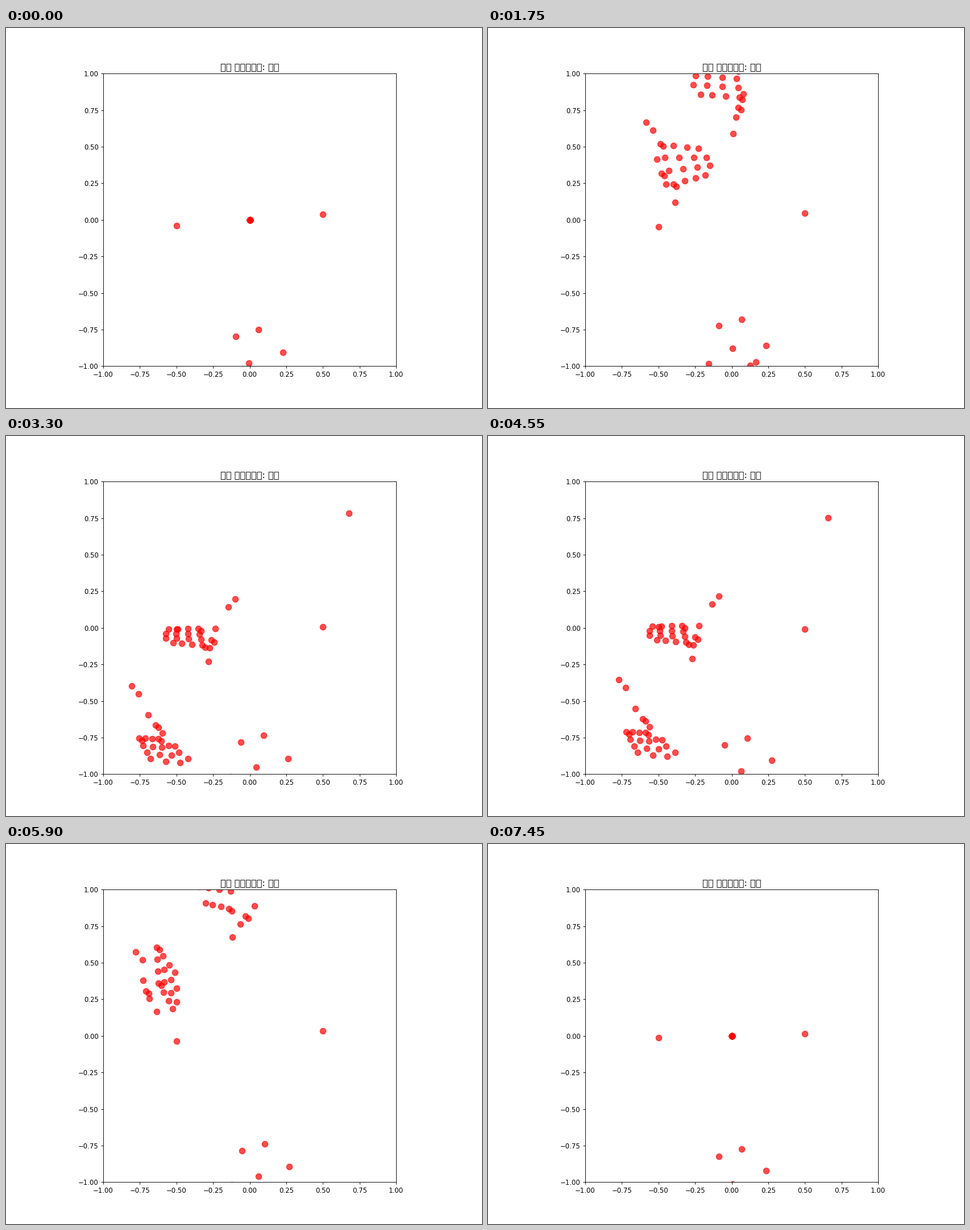
A matplotlib script that plays this animation: 837x669 px, repeating every 7500 ms.

```python
import numpy as np
import matplotlib.pyplot as plt
from matplotlib.animation import FuncAnimation

W, H = 837, 669
DPI = H / 8
FRAMES, INTERVAL = 150, 50
FIT = 10 * DPI / W                       # the 10 x 8 inch layout within the stage
UNIT = H * 0.77 / 2                      # stage pixels per data unit
CENTER = np.array([5.125 * DPI, H * 0.505])


def pts(*xy):
    return np.array(xy, float).reshape(-1, 2)


def track(frame, keys):
    """Linear motion through (time, value) keys."""
    times = [t for t, _ in keys]
    i = int(np.clip(np.searchsorted(times, frame, "right") - 1, 0, len(keys) - 2))
    (t0, a), (t1, b) = keys[i], keys[i + 1]
    u = np.clip((frame - t0) / (t1 - t0), 0, 1)
    return a + (b - a) * u


# Key points of a hand: wrist, thumb tip, index knuckle and tip, pinky knuckle and tip.
R_RAISED = pts(290, 180, 329, 307, 326, 275, 382, 259, 303, 204, 370, 212)
R_CHEST = pts(262, 310, 307, 422, 321, 379, 372, 353, 310, 312, 340, 312)
R_FACE = pts(233, 454, 297, 546, 268, 533, 320, 568, 234, 532, 254, 568)
R_LOW = pts(240, 204, 265, 295, 268, 245, 293, 290, 265, 182, 297, 226)
L_RAISED = pts(475, 70, 431, 186, 442, 122, 374, 117, 435, 72, 374, 68)
L_DROP = pts(428, 156, 340, 240, 380, 192, 330, 215, 372, 177, 320, 185)
L_CHEST = pts(391, 301, 356, 397, 345, 368, 294, 364, 338, 339, 286, 340)
L_LOW = pts(478, 72, 398, 164, 392, 114, 351, 104, 400, 20, 345, 20)

RIGHT = [(8, R_RAISED + (80, -220)), (35, R_RAISED), (50, R_CHEST), (66, R_FACE),
         (91, R_FACE + (9, -11)), (97, R_FACE + (9, -11)), (118, R_LOW),
         (128, R_LOW + (-18, -50)), (143, R_LOW + (10, -250))]
LEFT = [(8, L_RAISED + (0, -180)), (35, L_RAISED), (50, L_DROP), (66, L_CHEST),
        (91, L_CHEST + (3, -5)), (97, L_CHEST + (3, -5)), (118, L_LOW),
        (143, L_LOW + (0, -200))]
ELBOW = [(56, pts(650, 20)), (65, pts(603, 136)), (97, pts(597, 146)),
         (112, pts(648, 4))]
NOSE = [(0, pts(427, 590)), (35, pts(429.5, 564)), (50, pts(425, 574)),
        (66, pts(440, 583.5)), (91, pts(445, 590.5)), (118, pts(444, 585)),
        (149, pts(430, 599))]
TILT = [(0, 0.04), (35, 0.046), (50, 0.038), (66, 0.008),
        (91, -0.008), (118, 0.035), (149, 0.013)]

# Mouth corners, ears and eye, seen from the nose, and how far a nod shifts them.
FACE = pts(17, -51, -23, -40, 60, -5, -41, 27, 42, 24, 32, 30, 22, 36)
NOD = np.array([0.3, 0.25, 0.55, 0.55, 0.2, 0.2, 0.2])


def hand(key):
    """Wrist, thumb and four fingers fanned between index and pinky."""
    wrist, thumb_tip, index, index_tip, pinky, pinky_tip = key
    joints = [wrist]
    for u in (0.4, 0.6, 0.75, 1):
        joints.append(wrist + (thumb_tip - wrist) * u - (9 * np.sin(np.pi * u), 0))
    for k, length in enumerate((1, 1.2, 1.15, 1)):
        knuckle = index + (pinky - index) * k / 3
        tip = index_tip + (pinky_tip - index_tip) * k / 3
        joints += [knuckle + (tip - knuckle) * length * u for u in (0, 0.35, 0.7, 1)]
    return np.array(joints)


def arm(key, side):
    """Body-tracked wrist, pinky, index and thumb, close to the hand's joints."""
    return hand(key)[[0, 17, 5, 2]] + pts(12 * side, -14, 5, 4, 5, 4, 5, 4)


def grow(joints, weight):
    """An undetected hand collapses to the origin."""
    return CENTER + (joints - CENTER) * weight


def head(frame):
    nose = track(frame, NOSE)
    dx, dy = (nose - (428, 564))[0]
    return np.vstack([nose, nose + FACE - np.column_stack([0.35 * dx + 0 * NOD, NOD * dy])])


def pose(frame):
    right, left = track(frame, RIGHT), track(frame, LEFT)
    # After being lost, the left hand reopens straight into the chest pose.
    left_hand = left if frame < 47 else track(max(frame, 66), LEFT)
    right_w = np.interp(frame, [14, 19, 132, 137], [0, 1, 1, 0])
    left_w = np.interp(frame, [17, 21, 42, 46, 49, 56, 132, 137],
                       [0, 1, 1, 0, 0, 1, 1, 0])
    px = np.vstack([
        head(frame), track(frame, ELBOW),
        arm(right, -1), grow(hand(right), right_w),
        arm(left, 1), grow(hand(left_hand), left_w)])
    tilt = track(frame, TILT)
    shoulders = pts(0.5, tilt, -0.5, -tilt)
    return np.vstack([shoulders, (px - CENTER) / UNIT * (1, -1)])


plt.rcParams["font.family"] = ["DejaVu Sans"]
fig, ax = plt.subplots(figsize=((W + 0.001) / DPI, (H + 0.001) / DPI), dpi=DPI)
fig.subplots_adjust(left=0.125 * FIT, right=0.9 * FIT)
ax.set(xlim=(-1, 1), ylim=(-1, 1), aspect="equal")
ax.set_title("수어 애니메이션: 감사", fontsize=14)
dots = ax.scatter(*pose(0).T, c="red", s=80, alpha=0.7)


def update(frame):
    dots.set_offsets(pose(frame))
    return dots,


anim = FuncAnimation(fig, update, frames=FRAMES, interval=INTERVAL,
                     repeat=True, repeat_delay=0)
plt.show()
```
